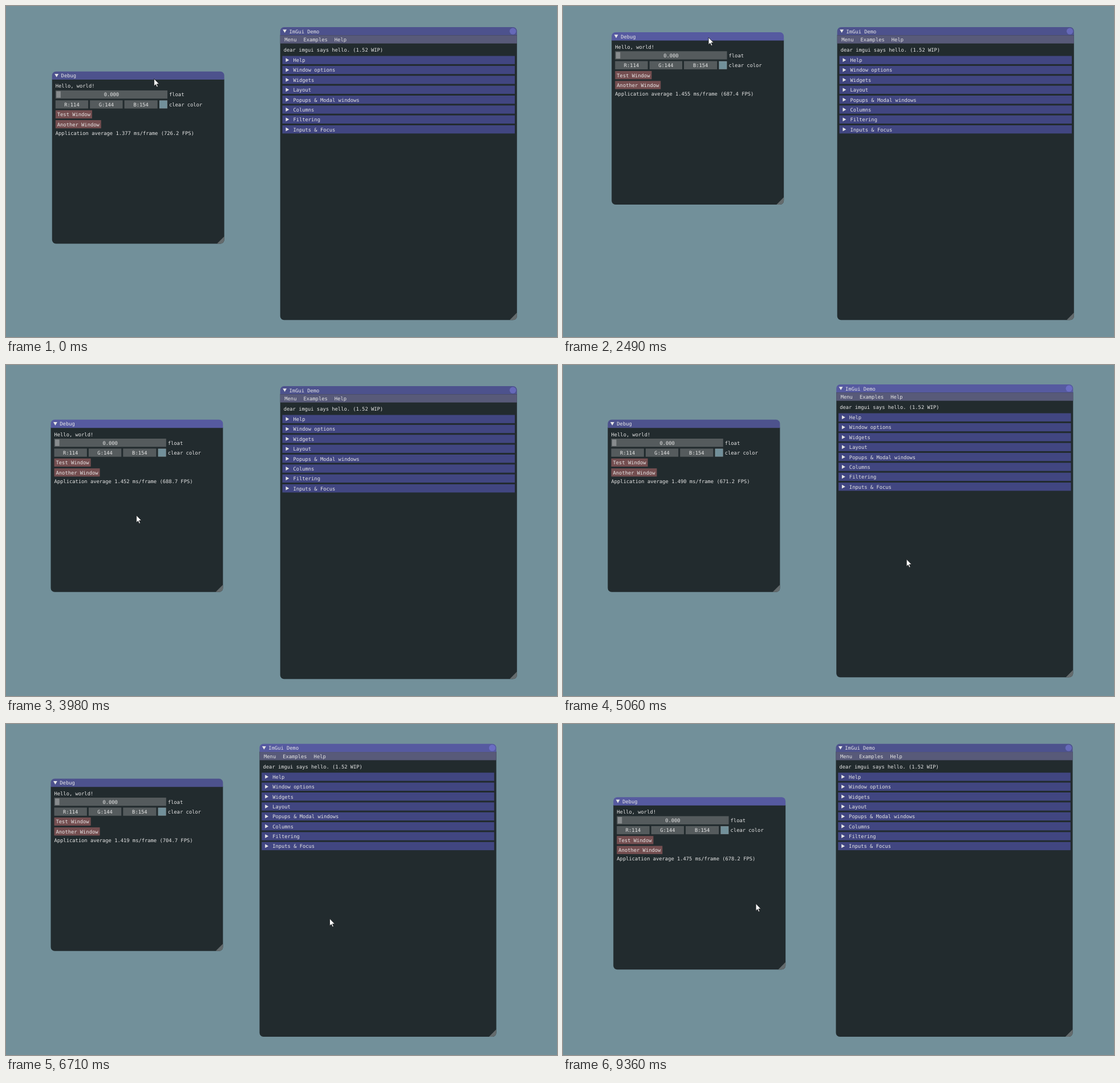
An HTML page for the animation above (9.45 s loop, 966 by 580 pixels).

```html
<!DOCTYPE html>
<html lang="en">
<head>
<meta charset="utf-8">
<title>Dragging windows</title>
<style>
  html, body { margin: 0; width: 100%; height: 100%; overflow: hidden; background: #72909a; }
  svg { display: block; width: 100vw; height: 100vh; }
  text {
    font: 11.63px "DejaVu Sans Mono", monospace;
    fill: #e6e6e6;
    text-rendering: geometricPrecision;
  }
  .body { fill: #222b2e; }
  .title { fill: #4d528d; }
  .active .title { fill: #565aa0; }
  .menubar { fill: #585a79; }
  .header { fill: #414681; }
  .frame { fill: #555b5d; }
  .grab { fill: #888c8e; }
  .button { fill: #744e50; }
  .grip { fill: #646b6d; }
  .close { fill: rgb(127 127 230 / .5); }
  .arrow { fill: #e6e6e6; }
  .swatch { fill: #72909a; stroke: rgb(204 204 204 / .3); }
  #cursor { fill: #fff; stroke: #16191b; stroke-width: 1; }
</style>
</head>
<body>
<svg viewBox="0 0 1280 768.53" preserveAspectRatio="none">
  <g id="demo"></g>
  <g id="debug"></g>
  <path id="cursor" d="M0 0V16.8L3.8 13.2 6.4 19.2 9 18 6.4 12.2H11.8Z"/>
</svg>
<script>
const LOOP = 9450;
const CHAR = 7;
const byId = id => document.getElementById(id);

// Widgets, laid out on the toolkit's own pixel grid
const rect = (cls, x, y, w, h = 19) =>
  `<rect class="${cls}" x="${x}" y="${y}" width="${w}" height="${h}"/>`;
const label = (x, y, str, id = '') =>
  `<text x="${x}" y="${y + 11}"${id && ` id="${id}"`}>${str}</text>`;
const centered = (x, y, w, str) => label(x + (w - str.length * CHAR) / 2, y + 3, str);
const field = (x, y, w, str) => rect('frame', x, y, w) + centered(x, y, w, str);
const button = (y, str) =>
  rect('button', 8, y, str.length * CHAR + 8) + label(12, y + 3, str);
const arrowDown = (x, y) => `<path class="arrow" d="M${x} ${y + 5.2}l-4.5-7.8h9z"/>`;
const arrowRight = (x, y) => `<path class="arrow" d="M${x + 5.2} ${y}l-7.8-4.5v9z"/>`;
const header = (y, str) =>
  rect('header', 5, y, 540) + arrowRight(15.5, y + 9.5) + label(30, y + 3, str);

const panel = (w, h, title, content) => `
  <path class="body" d="M0 18H${w}V${h - 9}a9 9 0 0 1-9 9H9a9 9 0 0 1-9-9z"/>
  <path class="title" d="M0 19V9a9 9 0 0 1 9-9H${w - 9}a9 9 0 0 1 9 9V19z"/>
  <path class="grip" d="M${w - 17} ${h}L${w} ${h - 17}v8a9 9 0 0 1-9 9z"/>
  ${arrowDown(10.5, 8.2)}${label(21, 3, title)}${content}`;

byId('debug').innerHTML = panel(400, 400, 'Debug',
  label(8, 27, 'Hello, world!') +
  field(8, 44, 260, '0.000') + rect('grab', 10, 46, 10, 15) + label(272, 47, 'float') +
  field(8, 67, 76, 'R:114') + field(88, 67, 76, 'G:144') + field(168, 67, 77, 'B:154') +
  rect('swatch', 249.5, 67.5, 18, 18) + label(272, 70, 'clear color') +
  button(90, 'Test Window') + button(113, 'Another Window') +
  label(8, 136, '', 'stats'));

const sections = ['Help', 'Window options', 'Widgets', 'Layout',
  'Popups &amp; Modal windows', 'Columns', 'Filtering', 'Inputs &amp; Focus'];
byId('demo').innerHTML = panel(550, 680, 'ImGui Demo',
  '<circle class="close" cx="540.5" cy="9.5" r="7.5"/>' +
  rect('menubar', 0, 19, 550) +
  label(10, 22, 'Menu') + label(54, 22, 'Examples') + label(126, 22, 'Help') +
  label(8, 46, 'dear imgui says hello. (1.52 WIP)') +
  sections.map((name, i) => header(67 + i * 23, name)).join(''));

// Tracks: [time, ...values]
const tracks = {
  debug: [
    [0, 107, 152], [350, 107, 152], [900, 108, 184], [1470, 122, 138], [1510, 122, 140],
    [1660, 95, 240], [1820, 104, 326], [1950, 114, 306], [2150, 123, 200],
    [2300, 118, 90], [2450, 113, 61], [3080, 113, 61], [3190, 113, 66],
    [3400, 114, 190], [3570, 105, 270], [3750, 95, 200], [3950, 104, 127],
    [7520, 104, 127], [7920, 117, 194], [8050, 117, 194], [8500, 117, 170], [LOOP, 117, 170]
  ],
  demo: [
    [0, 637, 49], [4700, 637, 49], [4980, 636, 44], [5060, 635, 45], [5500, 560, 45],
    [6040, 654, 45], [6710, 589, 46], [7080, 642, 46], [7250, 634, 46], [LOOP, 634, 46]
  ],
  fps: [
    [0, 726.2], [1490, 666.4], [3190, 699.7], [5060, 671.2],
    [6710, 704.7], [7960, 679.5], [9360, 678.16], [LOOP, 678.16]
  ]
};

// Drags: window held, start, end, pointer offset inside the window
const drags = [
  ['debug', 0, 70, 237, 17],
  ['debug', 350, 2450, 225, 9],
  ['debug', 3080, 3950, 197, 221],
  ['demo', 4700, 7250, 163, 406],
  ['debug', 7520, LOOP, 331, 247]
];

const slope = (a, b, k) => (b[k] - a[k]) / (b[0] - a[0]);

// Tangent that never overshoots: flat at turning points and rests
function tangent(keys, i, k) {
  if (i === 0 || i === keys.length - 1) return 0;
  const l = slope(keys[i - 1], keys[i], k), r = slope(keys[i], keys[i + 1], k);
  return l * r > 0 ? 2 * l * r / (l + r) : 0;
}

function sample(keys, t) {
  const i = Math.max(0, keys.findLastIndex(key => key[0] <= t && key[0] < LOOP));
  const a = keys[i], b = keys[i + 1], d = b[0] - a[0], u = (t - a[0]) / d;
  const s = u * u * (3 - 2 * u);
  return a.slice(1).map((v, n) => {
    const k = n + 1;
    return v + (b[k] - v) * s + d * u * (1 - u) *
      ((1 - u) * tangent(keys, i, k) - u * tangent(keys, i + 1, k));
  });
}

const windowAt = (name, t) => sample(tracks[name], t).map(Math.round);

function heldAt([name, , , dx, dy], t) {
  const [x, y] = windowAt(name, t);
  return [x + dx, y + dy];
}

function cursorAt(t, i) {
  const drag = drags[i], next = drags[i + 1];
  if (t <= drag[2]) return heldAt(drag, t);
  const from = heldAt(drag, drag[2]), to = heldAt(next, next[1]);
  const u = (t - drag[2]) / (next[1] - drag[2]), s = u * u * (3 - 2 * u);
  return from.map((v, k) => Math.round(v + (to[k] - v) * s));
}

const place = (id, [x, y]) => byId(id).setAttribute('transform', `translate(${x} ${y})`);

function draw(now) {
  const t = now % LOOP;
  const current = drags.findLastIndex(drag => drag[1] <= t);
  for (const name of ['debug', 'demo']) {
    place(name, windowAt(name, t));
    byId(name).classList.toggle('active', current > 0 && drags[current][0] === name);
  }
  place('cursor', cursorAt(t, current));
  const [fps] = sample(tracks.fps, t);
  byId('stats').textContent =
    `Application average ${(1000 / fps).toFixed(3)} ms/frame (${fps.toFixed(1)} FPS)`;
}

const start = performance.now();
function tick() {
  draw(performance.now() - start);
  requestAnimationFrame(tick);
}
tick();
</script>
</body>
</html>
```
